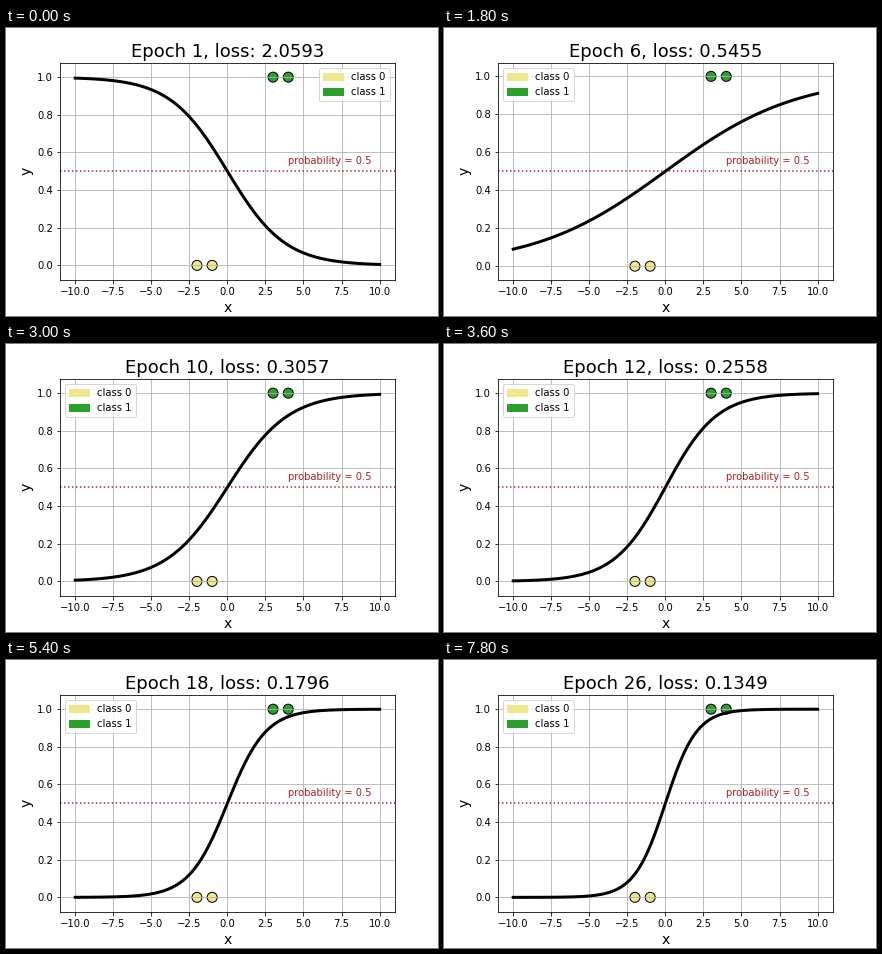
Recreate the animation shown at these times as a matplotlib script. Size 432 by 288 pixels, loop 8 s.

```python
import matplotlib.pyplot as plt
import numpy as np
from matplotlib.animation import FuncAnimation
from matplotlib.patches import Patch

FRAME_MS = 100
LOOP_MS = 8000
EPOCH_MS = 300
EPOCHS = 26
LEARNING_RATE = 0.1
START_WEIGHT = -0.75
MARKER_SIZE = 100
COLORS = ["khaki", "tab:green"]

points = np.array([-2, -1, 3, 4])
labels = np.array([0, 0, 1, 1])
xs = np.linspace(-10, 10, 100)


def sigmoid(z):
    return 1 / (1 + np.exp(-z))


def train():
    """Logistic regression without bias: loss before and weight after each step."""
    weight, history = START_WEIGHT, []
    for _ in range(EPOCHS):
        p = sigmoid(weight * points)
        loss = -np.mean(labels * np.log(p) + (1 - labels) * np.log(1 - p))
        weight -= LEARNING_RATE * np.mean((p - labels) * points)
        history.append((loss, weight))
    return history


history = train()

plt.rcParams.update({"font.family": "DejaVu Sans", "font.size": 10})
fig, ax = plt.subplots(figsize=(6, 4), dpi=72)
fig.subplots_adjust(left=0.125, right=0.9, bottom=0.125, top=0.88)
axes_height = 288 * (0.88 - 0.125)

ax.scatter(points, labels, s=MARKER_SIZE, c=[COLORS[k] for k in labels],
           edgecolors="black", linewidths=1)
ax.axhline(0.5, color="firebrick", linestyle=":", linewidth=1.5)
curve, = ax.plot(xs, sigmoid(xs), color="black", linewidth=3)
ax.text(4, 0.54, "probability = 0.5", color="firebrick")
ax.set_xlim(-11, 11)
ax.set_xlabel("x", fontsize=14)
ax.set_ylabel("y", fontsize=14)
ax.grid(True)
title = ax.set_title("", fontsize=18)
ax.legend(handles=[Patch(color=c, label=f"class {k}") for k, c in enumerate(COLORS)],
          loc="best")


def update(frame):
    epoch = min(max(frame * FRAME_MS // EPOCH_MS, 1), EPOCHS)
    loss, weight = history[epoch - 1]
    ys = sigmoid(weight * xs)
    curve.set_ydata(ys)
    title.set_text(f"Epoch {epoch}, loss: {loss:.4f}")
    # Limits leave room for the marker radius, measured at the curve's own scale.
    radius = np.sqrt(MARKER_SIZE) / 2 * np.ptp(ys) * 1.1 / axes_height
    margin = radius + 0.05 * (1 + 2 * radius)
    ax.set_ylim(-margin, 1 + margin)
    return curve, title


anim = FuncAnimation(fig, update, frames=LOOP_MS // FRAME_MS, interval=FRAME_MS,
                     repeat=True, repeat_delay=0, blit=False)
plt.show()
```
